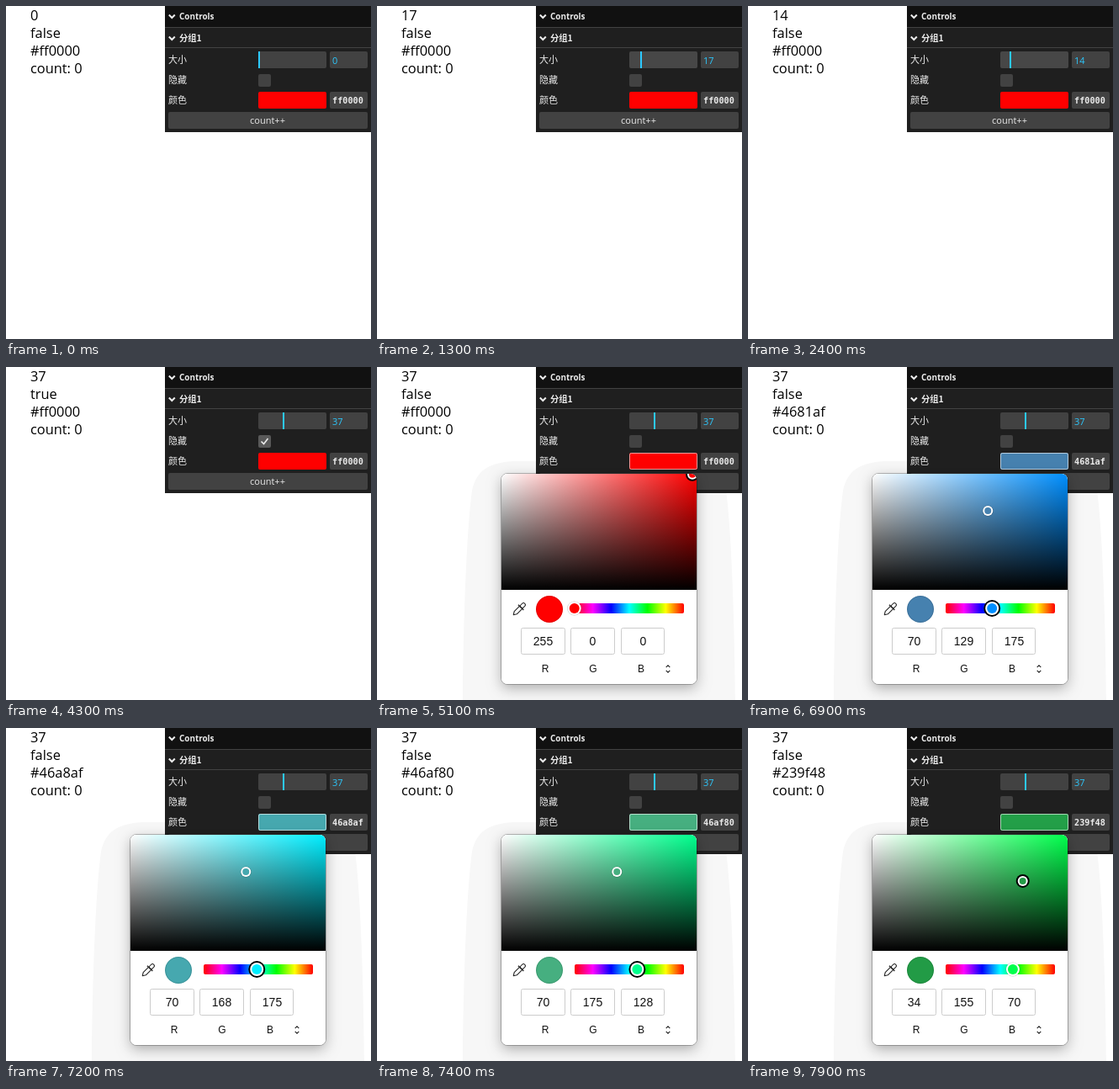
Write an HTML page with a canvas that moves like this. It is 434 px wide and 396 px high and loops after 8 s.

```html
<!DOCTYPE html>
<html lang="zh">
<head>
<meta charset="utf-8">
<title>Controls</title>
<style>
html, body { margin: 0; width: 100%; height: 100%; overflow: hidden; background: #fff; }
canvas { display: block; width: 434px; height: 396px; }
</style>
</head>
<body>
<canvas id="stage"></canvas>
<script>
const W = 434, H = 396, LOOP = 8000, STEP = 100;
const canvas = document.getElementById('stage');
const ctx = canvas.getContext('2d');
const dpr = window.devicePixelRatio || 1;
canvas.width = W * dpr;
canvas.height = H * dpr;

const SANS = '"Open Sans", sans-serif';
const CJK = '"Noto Sans CJK SC", "Noto Sans CJK", sans-serif';
const MONO = '"DejaVu Sans Mono", monospace';
const ARIAL = '"Liberation Sans", sans-serif';
const WIDGET = '#424242', HOVER = '#474747', ACTIVE = '#595959';
const TEXT = '#ebebeb', BLUE = '#2cc9ff', INK = '#222';

// key points of each drag: [time, value]
const sizeDrag = [[1100, 0], [1700, 52], [1800, 52], [2400, 14], [2500, 14], [2700, 37]];
const hueDrag = [[6600, 360], [6900, 206.3], [7000, 195], [7100, 195], [7200, 184], [7500, 137.87]];
const satDrag = [[5300, 1], [5900, .634], [6100, .6], [7700, .6], [7900, .78]];
const valDrag = [[5300, 255], [5900, 112], [6100, 175], [7700, 175]];
// the page value trails the picker at the end
const pickerVal = [...valDrag, [7900, 155]];
const pageVal = [...valDrag, [7900, 159]];

const within = (t, a, b) => t >= a && t < b;

function tween(keys, t) {
  const next = keys.findIndex(k => k[0] > t);
  if (next === 0) return keys[0][1];
  if (next < 0) return keys[keys.length - 1][1];
  const [t0, a] = keys[next - 1], [t1, b] = keys[next];
  return a + (b - a) * (t - t0) / (t1 - t0);
}

function hsv(h, s, v) {
  return [5, 3, 1].map(n => {
    const k = (n + h / 60) % 6;
    return Math.round(v - v * s * Math.max(0, Math.min(k, 4 - k, 1)));
  });
}
const toHex = rgb => rgb.map(c => c.toString(16).padStart(2, '0')).join('');

function text(str, x, y, font, color, align = 'left') {
  ctx.font = font;
  ctx.fillStyle = color;
  ctx.textAlign = align;
  ctx.fillText(str, x, y);
}

function box(x, y, w, h, r, fill, stroke) {
  ctx.beginPath();
  ctx.roundRect(x, y, w, h, r);
  if (fill) { ctx.fillStyle = fill; ctx.fill(); }
  if (stroke) { ctx.strokeStyle = stroke; ctx.lineWidth = 1; ctx.stroke(); }
}

function disc(x, y, r, fill) {
  ctx.beginPath();
  ctx.arc(x, y, r, 0, Math.PI * 2);
  ctx.fillStyle = fill;
  ctx.fill();
}

function line(points, color, width) {
  ctx.beginPath();
  points.forEach(([x, y]) => ctx.lineTo(x, y));
  ctx.strokeStyle = color;
  ctx.lineWidth = width;
  ctx.stroke();
}

function chevron(x, y, size, dir, color, width) {
  const dy = dir * size / 2;
  line([[x - size, y - dy], [x, y + dy], [x + size, y - dy]], color, width);
}

function drawPage(s) {
  [s.size, s.checked, '#' + s.hex, 'count: 0'].forEach((str, i) =>
    text(String(str), 29, 17 + 21 * i, '16.4px ' + SANS, '#000'));
}

function drawPanel(s, t) {
  ctx.fillStyle = '#1f1f1f';
  ctx.fillRect(189, 0, 245, 150);
  ctx.fillStyle = '#111';
  ctx.fillRect(189, 0, 245, 25);
  ctx.fillStyle = WIDGET;
  ctx.fillRect(189, 25, 245, 1);
  ctx.fillRect(189, 49, 245, 1);

  chevron(197.3, 12.3, 3.5, 1, TEXT, 2);
  text('Controls', 206, 16, 'bold 9.9px ' + SANS, TEXT);
  ctx.globalAlpha = within(t, 600, 700) ? .85 : 1;
  chevron(197.3, 38.3, 3.5, 1, TEXT, 2);
  text('分组1', 206, 42, 'bold 10.3px ' + CJK, TEXT);
  ctx.globalAlpha = 1;
  ['大小', '隐藏', '颜色'].forEach((label, i) =>
    text(label, 193, 68 + 24 * i, '500 11px ' + CJK, TEXT));

  box(300, 54, 81, 20, 2, within(t, 800, 3000) ? HOVER : WIDGET);
  ctx.fillStyle = BLUE;
  ctx.fillRect(300 + Math.floor(s.size * .8), 54, 2, 20);
  box(385, 54, 45, 20, 2, WIDGET);
  text(String(s.size), 388, 69, '11px ' + SANS, BLUE);

  box(300, 81, 15, 15, 2, within(t, 3500, 4700) ? ACTIVE : within(t, 3000, 3500) ? HOVER : WIDGET);
  if (s.checked) line([[303.5, 88.5], [306.5, 91.5], [311.5, 85]], TEXT, 1.6);

  box(300, 102, 81, 20, 2, '#' + s.hex);
  if (t >= 4700) box(300.5, 102.5, 80, 19, 2, null, 'rgba(255,255,255,.6)');
  box(385, 102, 45, 20, 2, WIDGET);
  text(s.hex, 388, 116, 'bold 10.2px ' + MONO, TEXT);

  box(193, 126, 237, 20, 2, WIDGET);
  text('count++', 311, 140, '11px ' + SANS, TEXT, 'center');
}

function drawHalo() {
  const mid = 264;
  ctx.beginPath();
  for (const side of [-1, 1]) {
    const x = d => mid + side * d;
    ctx.moveTo(mid, H);
    ctx.lineTo(x(162), H);
    ctx.bezierCurveTo(x(161), 290, x(157), 190, x(151), 147);
    ctx.bezierCurveTo(x(146), 124, x(132), 113, x(100), 112);
    ctx.lineTo(mid, 112);
  }
  ctx.fillStyle = '#f7f7f7';
  ctx.fill();
}

function knob(x, y, color, focused, radius) {
  if (focused) disc(x, y, radius + 2, '#000');
  else disc(x, y, radius + .6, 'rgba(0,0,0,.2)');
  disc(x, y, radius, '#fff');
  disc(x, y, radius - 2, color);
}

function gradient(x0, y0, x1, y1, stops) {
  const g = ctx.createLinearGradient(x0, y0, x1, y1);
  stops.forEach((c, i) => g.addColorStop(i / (stops.length - 1), c));
  return g;
}

function drawDropper() {
  ctx.save();
  ctx.translate(169, 288);
  ctx.rotate(Math.PI / 4);
  ctx.lineJoin = 'round';
  box(-2.2, -9.5, 4.4, 6.5, 2.2, null, INK);
  line([[-4.5, -3], [4.5, -3]], INK, 1.4);
  line([[-2.2, -2.5], [-2.2, 6], [0, 9.5], [2.2, 6], [2.2, -2.5]], INK, 1.1);
  ctx.restore();
}

function drawPicker(s, t) {
  const { hue, sat, val, rgb } = s;
  const pure = `rgb(${hsv(hue, 1, 255)})`;
  const color = `rgb(${rgb})`;
  const onHue = within(t, 6700, 7800);

  ctx.save();
  ctx.shadowColor = 'rgba(0,0,0,.3)';
  ctx.shadowBlur = 16 * dpr;
  ctx.shadowOffsetY = 5 * dpr;
  box(148, 127, 232, 250, 7, '#fff');
  ctx.restore();
  box(147.5, 126.5, 233, 251, 7.5, null, 'rgba(0,0,0,.25)');

  ctx.save();
  box(148, 127, 232, 250, 7, '#fff');
  ctx.clip();
  ctx.beginPath();
  ctx.rect(148, 127, 232, 138);
  ctx.clip();
  ctx.fillStyle = gradient(148, 0, 380, 0, ['#fff', pure]);
  ctx.fillRect(148, 127, 232, 138);
  ctx.fillStyle = gradient(0, 127, 0, 265, ['rgba(0,0,0,0)', '#000']);
  ctx.fillRect(148, 127, 232, 138);
  const x = Math.min(375, 147 + 230.4 * sat);
  const y = 127.8 + 138 * (1 - val / 255);
  knob(x, y, color, !onHue && t >= 5100, 6);
  ctx.restore();

  drawDropper();
  disc(205, 288, 16, color);
  ctx.strokeStyle = 'rgba(0,0,0,.12)';
  ctx.lineWidth = 1;
  ctx.beginPath();
  ctx.arc(205, 288, 15.5, 0, Math.PI * 2);
  ctx.stroke();

  box(235, 281, 130, 12, 2, gradient(235, 0, 365, 0,
    ['#f00', '#f0f', '#00f', '#0ff', '#0f0', '#ff0', '#f00']));
  knob(234.7 + 130 * (1 - hue / 360), 287, pure, onHue, 8);

  rgb.forEach((value, i) => {
    const left = Math.round(170.8 + 59.4 * i), right = Math.round(222.6 + 59.4 * i);
    box(left + .5, 310.5, right - left, 31, 2, '#fff', '#ccc');
    text(String(value), left + 26.5, 331, '14px ' + ARIAL, '#111', 'center');
    text('RGB'[i], 200 + 57 * i, 363, '12px ' + ARIAL, '#111', 'center');
  });
  chevron(346, 356, 2.3, -1, INK, 1.1);
  chevron(346, 362, 2.3, 1, INK, 1.1);
}

function stateAt(t) {
  const hue = tween(hueDrag, t), sat = tween(satDrag, t), val = tween(pickerVal, t);
  return {
    hue, sat, val,
    rgb: hsv(hue, sat, val),
    hex: toHex(hsv(hue, sat, tween(pageVal, t))),
    size: Math.round(tween(sizeDrag, t)),
    checked: within(t, 3600, 4000) || within(t, 4300, 4500)
  };
}

function draw(t) {
  const s = stateAt(t);
  const open = t >= 5000;
  ctx.setTransform(dpr, 0, 0, dpr, 0, 0);
  ctx.fillStyle = '#fff';
  ctx.fillRect(0, 0, W, H);
  if (open) drawHalo();
  drawPage(s);
  drawPanel(s, t);
  if (open) drawPicker(s, t);
}

const start = performance.now();
function tick() {
  const t = (performance.now() - start) % LOOP;
  draw(Math.floor(t / STEP) * STEP);
  requestAnimationFrame(tick);
}
tick();
</script>
</body>
</html>
```
